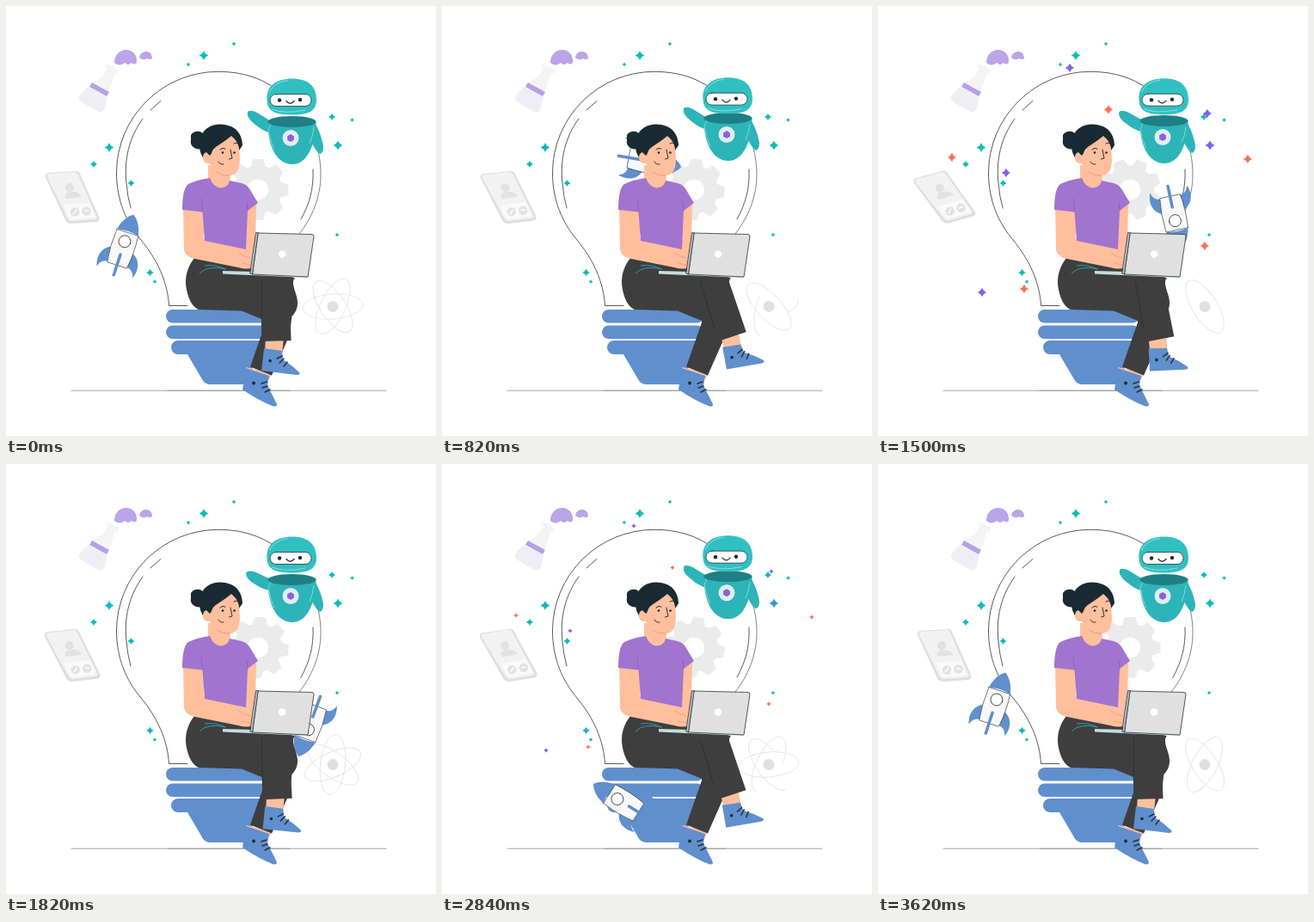
Recreate the animation shown at these times as an HTML page. Size 500 px wide and 500 px high, loop 3640 ms.

```html
<!DOCTYPE html>
<html lang="en">
<head>
<meta charset="utf-8">
<title>Idea workshop</title>
<style>
html, body { margin: 0; width: 100%; height: 100%; overflow: hidden; background: #fff; }
svg { display: block; width: 100vw; height: 100vh; }
.line { fill: none; stroke: #263238; stroke-width: .8; stroke-linecap: round; stroke-linejoin: round; }
.blue { fill: #5f8fcd; }
.skin { fill: #ffbf9d; }
.pants { fill: #3e3e3e; }
.hair { fill: #1a2a32; }
.teal { fill: #30c0c2; }
.body { fill: #2cb4b9; }
.pale { fill: #ebebeb; }
</style>
</head>
<body>
<svg viewBox="0 0 500 500">
  <!-- ground and bulb -->
  <path class="line" d="M76 447.2H442" stroke-opacity=".55"/>
  <path class="line" d="M188 447.2H330" stroke-opacity=".35"/>
  <g class="line">
    <path d="M211 348.5H189.500C188 321 176 295 157 272C140 252 128.500 226 128.500 194A118.500 118 0 0 1 247 76.300C275 76.300 296 84 312 95"/>
    <path d="M356 150C363 163 366 180 366 196C366 222 356 246 341 265" stroke-opacity=".75"/>
    <path d="M159 131C143 153 137 179 140 206Q141 220 145 235M168 121L180 110.500M357 190C358 212 353 230 343 248"/>
  </g>
  <g id="gear"></g>
  <g class="blue">
    <rect x="186" y="353" width="118" height="15.500" rx="7.700"/>
    <rect x="186" y="371.500" width="118" height="15.500" rx="7.700"/>
    <path d="M200 389H297V405H293L279 440H238Q231 440 228 434L211 405H200A8 8 0 0 1 200 389Z"/>
  </g>

  <!-- flask -->
  <path fill="#f4f4f5" d="M117 66.500L132 74.500L129 79L127 78L118 104L97 92L113 81L118 72L115 70Z"/>
  <path fill="#efeef6" d="M95 94L118 106L115 119Q113 125 107 123L88 112Q83 108 86 103Z"/>
  <path fill="#b7a0e4" d="M100 89L120 100L117 105L97 94Z"/>
  <path fill="#bba5e8" d="M126 66C126 57 132 51 140 51C148 51 153 58 152 66Q149 69 146 66Q142 70 138 66Q132 71 126 66ZM155 60C156 55 159 53 163 53C168 53 170 57 170 61Q167 63 164 61Q160 64 155 60Z"/>

  <g id="phone">
    <path fill="#dedede" d="M49 194L82 192Q85 192 86 195L108 245Q110 250 105 251L76 253Q71 253 69 249L46 199Q45 195 49 194Z"/>
    <path fill="#f2f2f2" d="M50 195L80 193Q83 193 84 196L105 244Q107 248 103 248L77 250Q73 250 71 246L48 199Q47 196 50 195Z"/>
    <path fill="#fafafa" d="M67 231L97 229L103 243Q104 246 101 246L77 248Q74 248 73 245Z"/>
    <g fill="#e2e2e2">
      <circle cx="74" cy="211" r="5"/>
      <path d="M69 224Q67 216 76 216Q84 215 88 222Z"/>
      <circle cx="80" cy="239.500" r="5.200"/><circle cx="93.500" cy="238.500" r="5.200"/>
    </g>
    <path d="M78 242L82 237M91 239Q94 236 96 239" fill="none" stroke="#fff" stroke-width="1.500"/>
  </g>

  <g id="atom" fill="none" stroke="#e4e4e4" stroke-width=".9"></g>
  <circle cx="380" cy="349.500" r="6.500" fill="#e0e0e0"/>
  <g id="stars" fill="#0abbbc"></g>
  <g id="sparks"></g>

  <g id="rocket">
    <g class="blue">
      <path d="M12 10C22 14 27 24 22 37.500C20 31 17 28 11 28Z"/>
      <path d="M-12 10C-22 14 -27 24 -22 37.500C-20 31 -17 28 -11 28Z"/>
    </g>
    <path class="line" style="fill:#f8f8f8;stroke-width:.6" d="M-13 -11H13Q15 10 12 29H-12Q-15 10 -13 -11Z"/>
    <path class="blue" d="M-13 -11C-11 -22 -6 -29 0 -33C6 -29 11 -22 13 -11Q0 -14 -13 -11Z"/>
    <circle class="line" r="7" style="fill:#fff"/>
    <path d="M0 16V41" stroke="#5f8fcd" stroke-width="3.500" stroke-linecap="round"/>
  </g>

  <!-- robot -->
  <g id="torso">
    <path id="arm" class="body" d="M308 134L292 124Q284 120 281 123Q279 130 290 138Q298 145 308 148Z"/>
    <path class="body" d="M357 133Q366 146 369 163Q369 171 365 172Q360 169 354 156Z"/>
    <path class="body" d="M304.500 134.500C304 160 313 184 333 184C351 184 360 160 360.500 134.500Z"/>
    <path d="M358 141Q357 151 353 160M309 135L305 144Q307 157 312 167" fill="none" stroke="#9fe2e2" stroke-width=".7"/>
    <ellipse cx="332.500" cy="134.500" rx="28" ry="6.500" fill="#1e7f85"/>
    <circle cx="331" cy="153.500" r="9.500" fill="#dfeef3"/>
    <path d="M331 149L334.900 151.300V155.800L331 158L327.100 155.800V151.300Z" fill="#8e63d2"/>
  </g>
  <g id="head">
    <path class="teal" d="M303.500 110C302 93 314 84.500 333 84.500C352 84.500 361 94 361 109C361 122 352 126.500 333 126.500C314 126.500 304 123 303.500 110Z"/>
    <path d="M306 101Q312 88 328 86.500M309 120Q324 126 348 121" fill="none" stroke="#a5e4e4" stroke-width=".8"/>
    <rect class="line" style="fill:#fff" x="307" y="102.500" width="48" height="14" rx="7"/>
    <g class="hair"><circle cx="318" cy="109.500" r="2.200"/><circle cx="342" cy="109" r="2.200"/></g>
    <path class="line" style="stroke-width:1.3" d="M326 110.500Q330.500 116 335 110.500"/>
  </g>

  <!-- woman -->
  <path class="skin" d="M281 235L291 231L290 275L286 292L275 292Z"/>
  <path class="skin" d="M279 420L310 427L306 434L280 426Z"/>
  <path class="blue" d="M279 421L306 430L304 441L314 461Q317 466 311 465.500Q294 459 275 446Z"/>
  <circle class="hair" cx="288" cy="438.500" r="1.900"/>
  <path class="line" style="stroke-width:1.5" d="M297 439L303 437M298 444L304 442M301 449L307 446"/>
  <path class="pants" d="M302 340L333 355L330 382L309 429.500L284 419.500L302 368Z"/>
  <path class="pants" d="M219 293L280 303L336 316C330 322 339 335 339 344Q340 355 330 363L310 369L302 366L274 354.500L224 353Q214 349 210 330C207 316 211 303 219 293Z"/>
  <path d="M225 311Q234 301 256 306M231 302Q244 300 255 306" fill="none" stroke="#2aa9b2" stroke-width=".9"/>
  <g id="shin">
    <path class="skin" d="M302 384H323L321 404L301 401Z"/>
    <path class="blue" d="M300 398L321 401L322 411Q333 418 341 426Q343 429 338 429L297 424Z"/>
    <circle class="hair" cx="307" cy="412.500" r="1.800"/>
    <path class="line" style="stroke-width:1.5" d="M315 410L321 407M318 415L323 410M323 419L327 414"/>
    <path class="pants" d="M297 318Q312 304 329 318L331.500 389L297 390Z"/>
    <path class="line" d="M297.500 319V373"/>
  </g>
  <path class="skin" d="M206 232L230 236L230 270L279 281L282 283Q287 288 287 304Q281 307 270 304L220 294Q207 291 207 282Z"/>
  <path class="skin" d="M235 185L262 187L260 207Q252 215 243 211L235 202Z"/>
  <path fill="#a174cf" d="M237 200Q241 211 250 211.500Q258 211 260 203L274 206Q281 208 284 214L293 229L281 238L279 283L231 273L228.500 239.500L205 237Q205 212 212 207Q222 202 237 200Z"/>
  <path d="M228.500 239L227 224M281 238L280 228" stroke="#865bb8" stroke-width=".7" fill="none"/>
  <g class="hair">
    <path d="M215 150C219 144 228 145 230 150L231 165C223 169 213 164 215 156Z"/>
    <path d="M226 170C222 151 231 138 249 137.500C264 138 274 145 275 162L271 168L240 184L231 181Z"/>
  </g>
  <path class="skin" d="M260 150C267 154 271 160 271.500 170C273 185 271 196 261 197C250 198 240 191 237 183C229 184 227 175 231 171Q236 168 238 174C241 165 244 158 260 150Z"/>
  <path class="hair" d="M237 174C240 163 250 162 263 150L244 144L232 158L232 169Z"/>
  <path class="line" style="stroke-width:1" d="M261 167L263 177L259.500 178M247 181Q249 185 253 184M249 167Q252 164 255 166M265 160Q268 158 270 160"/>
  <g class="hair"><circle cx="252" cy="170.500" r="1.300"/><circle cx="265.500" cy="170.500" r="1.300"/></g>
  <path d="M245 193Q252 198 260 197" stroke="#f09a78" stroke-width="1" fill="none"/>

  <!-- laptop -->
  <path d="M271 287Q277 292 284 293M274 299L284 301" fill="none" stroke="#e99a79" stroke-width=".8"/>
  <path fill="#c9dcdc" d="M252 308L290 309L351 314L350 316L252 311.500Z"/>
  <path class="line" style="fill:#b9bcbe" d="M291 263.500L294 264L287 312L284 311Z"/>
  <path class="line" style="fill:#e0e0e0" d="M293.500 264L356 265.500Q358 265.500 358 268L351 315L287 312Z"/>
  <circle cx="321" cy="288.500" r="4.200" fill="#fff"/>
</svg>
<script>
const LOOP = 3640;
const SPAN = 3600; // motion ends here and rests until the loop restarts
const $ = id => document.getElementById(id);
const { sin, cos, abs, min, exp, PI } = Math;

function add(parent, tag, attrs) {
  const el = document.createElementNS('http://www.w3.org/2000/svg', tag);
  for (const k in attrs) el.setAttribute(k, attrs[k]);
  parent.appendChild(el);
  return el;
}
const move = (el, value) => el.setAttribute('transform', value);

// four-pointed star around the origin
const star = r => {
  const q = r * .26;
  return `M0 ${-r}Q${q} ${-q} ${r} 0Q${q} ${q} 0 ${r}Q${-q} ${q} ${-r} 0Q${-q} ${-q} 0 ${-r}Z`;
};

[[230,57.5,5.5],[265,44,2.4],[212,68,2.4],[120,164.5,5.5],[102,184,4],[145.5,206,4],
 [379,129,4],[402.5,132.5,2.4],[386,162,5.5],[385,266,2.4],[167.5,310,4.2],[173,320.5,2.4]]
  .forEach(([x, y, r]) => add($('stars'), 'path', { d: star(r), transform: `translate(${x} ${y})` }));

const violet = '#8a5cf0', coral = '#ff7058';
const sparks = [
  [223,72,violet],[149,194,violet],[383,125,violet],[386,162,violet],[121,333,violet],
  [86,176,coral],[268,120.5,coral],[430,178,coral],[380,279,coral],[170,329,coral]
].map(([x, y, fill]) => ({ x, y, el: add($('sparks'), 'path', { d: star(5.2), fill }) }));

for (let i = 0; i < 8; i++)
  add($('gear'), 'path', { class: 'pale', d: 'M-9 -26L-6 -35.500H6L9 -26Z', transform: `rotate(${i * 45})` });
add($('gear'), 'circle', { r: 20, fill: 'none', stroke: '#ebebeb', 'stroke-width': 16 });

// drawn share of each ring over time
const keys = [0, 820, 1500, 1820, 2480, 3180, 3600];
const tilt = [-4, -13, -2, -24, -10, 0, -3];
const rings = [
  [1, .12, 0, 1, 1, 1, 0],
  [1, 1, 1, 1, 1, .4, 1],
  [1, .3, 0, 1, 1, .4, 1]
].map((share, i) => ({
  share,
  el: add($('atom'), 'ellipse', { rx: 35, ry: 14.5, pathLength: 100, transform: `rotate(${i * 60})` })
}));

function track(values, t) {
  let i = 0;
  while (i < keys.length - 2 && t > keys[i + 1]) i++;
  const k = (t - keys[i]) / (keys[i + 1] - keys[i]);
  return values[i] + (values[i + 1] - values[i]) * k;
}

function draw(time) {
  const t = min(time, SPAN);
  const turn = t / SPAN;
  const half = turn * 2 % 1;

  move($('rocket'), `rotate(${turn * 360} 245 289.500) translate(138 274) rotate(18)`);
  move($('gear'), `translate(293 213.500) rotate(${turn * 810})`);
  move($('shin'), `rotate(${-17 * 4 * half * (1 - half)} 309 309)`);

  const rise = (1 - cos(2 * PI * half)) / 2;
  move($('torso'), `translate(0 ${-4 * rise})`);
  move($('head'), `translate(0 ${-1.4 * rise})`);
  const wave = exp(-(((t - SPAN / 2) / 300) ** 2));
  move($('arm'), `rotate(${-7 * wave} 306 140)`);

  const swing = 1 - abs(1 - 2 * (turn * 18 % 1));
  move($('phone'), `rotate(${-12 * swing} 77 222)`);

  const beat = t % (SPAN / 3);
  const size = beat < 600 ? sin(PI * beat / 600) ** 2 : 0;
  for (const s of sparks) move(s.el, `translate(${s.x} ${s.y}) scale(${size})`);

  move($('atom'), `translate(380 349.500) rotate(${track(tilt, t)})`);
  for (const r of rings) {
    const p = track(r.share, t);
    r.el.setAttribute('visibility', p > .01 ? 'visible' : 'hidden');
    r.el.setAttribute('stroke-dasharray', p > .99 ? 'none' : `${p * 100} 100`);
  }
}

const start = performance.now();
function tick() {
  draw((performance.now() - start) % LOOP);
  requestAnimationFrame(tick);
}
tick();
</script>
</body>
</html>
```
